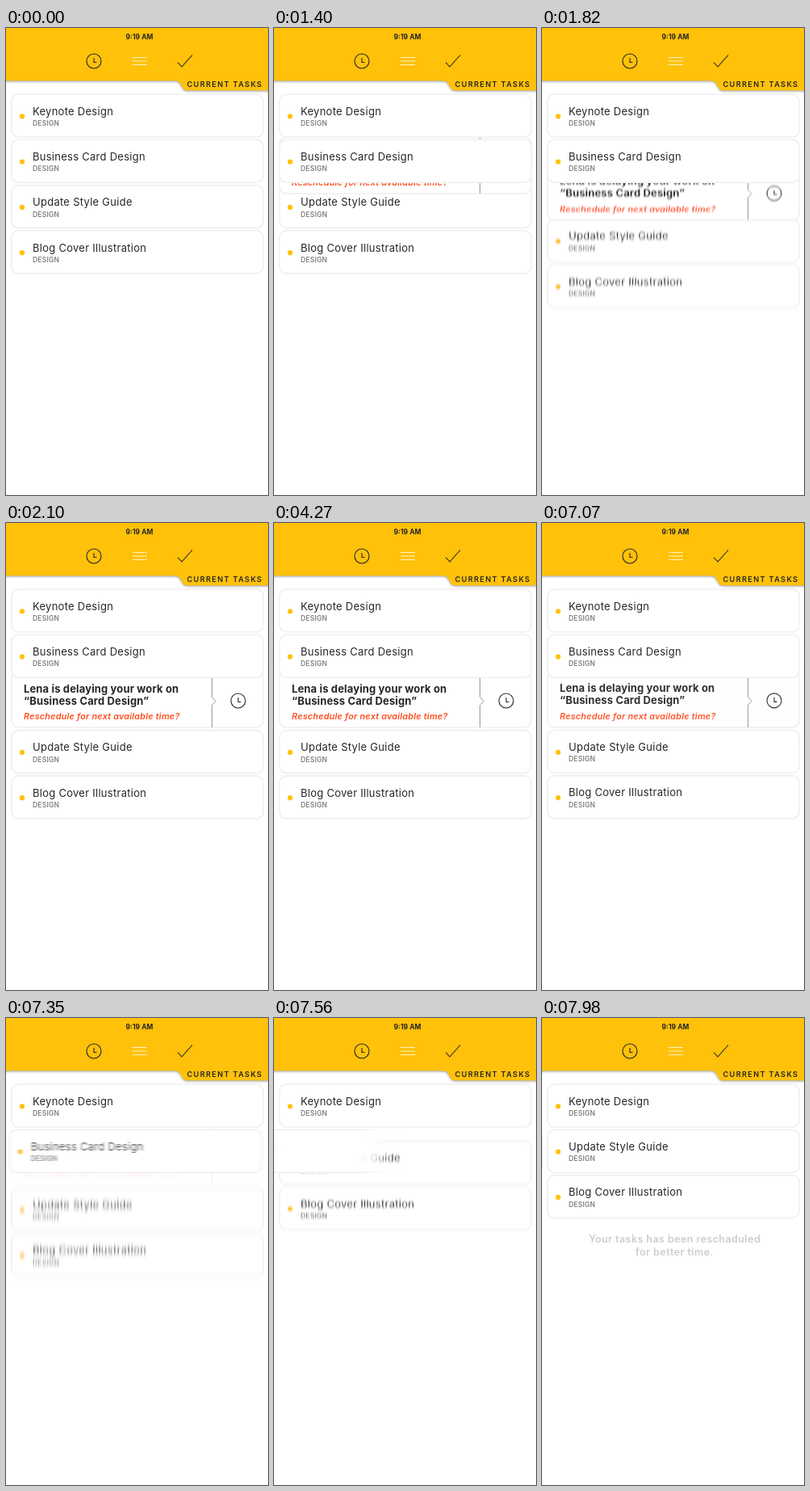
An HTML page for the animation above (8000 ms loop, 325x578 px).

```html
<!DOCTYPE html>
<html lang="en">
<head>
<meta charset="utf-8">
<title>Current tasks</title>
<style>
  html, body { margin: 0; height: 100%; overflow: hidden; background: #fff; }
  svg { display: block; width: 100%; height: 100%; font-family: Inter, "Open Sans", sans-serif; fill: #262626; }
  .box { fill: #fff; stroke: #efefef; stroke-width: 1.6; }
  .title { font-size: 13px; letter-spacing: .27px; }
  .tag { font-size: 8.5px; font-weight: 600; letter-spacing: .2px; fill: #808080; }
  .dot, .bar { fill: #ffc10a; }
  .bar { filter: drop-shadow(0 1px 1.5px rgba(0, 0, 0, .4)); }
  .line { fill: none; stroke: #262626; stroke-width: 1.1; }
  .menu { fill: none; stroke: #fff3c8; stroke-width: 1.1; }
  .divider { fill: none; stroke: #999; }
  .time { font-size: 8.5px; font-weight: 700; text-anchor: middle; }
  .tab { font-size: 9.2px; font-weight: 600; letter-spacing: 1.33px; }
  .notice { font-size: 13px; font-weight: 700; letter-spacing: .14px; }
  .ask { font-size: 10.8px; font-weight: 600; font-style: italic; letter-spacing: .22px; fill: #ff4c1c; }
  .done { font-size: 12.5px; font-weight: 600; letter-spacing: .43px; text-anchor: middle; fill: #cdcdcd; }
</style>
</head>
<body>
<svg viewBox="0 0 325 578" preserveAspectRatio="none">
  <defs>
    <filter id="blurCards" filterUnits="userSpaceOnUse" x="-60" width="460"><feGaussianBlur/></filter>
    <filter id="blurPanel" filterUnits="userSpaceOnUse" x="-60" width="460"><feGaussianBlur/></filter>
    <filter id="blurOut" filterUnits="userSpaceOnUse" x="-60" width="460"><feGaussianBlur/></filter>
    <clipPath id="panelClip"><rect x="7" y="183" width="312" height="70" rx="9"/></clipPath>
    <g id="clock" class="line"><circle r="9"/><path d="M0-4V1.5H3.5"/></g>
  </defs>

  <g id="rest"></g>

  <g id="panel">
    <rect class="box" x="6.7" y="183" width="312.6" height="70" rx="9"/>
    <circle id="ripple" cx="288" cy="221" fill="#f2f2f2" clip-path="url(#panelClip)"/>
    <path class="divider" d="M255.5 183V215.5L260 220.5 255.5 225.5V253"/>
    <use href="#clock" x="288" y="220"/>
    <text class="notice" x="22" y="209.5">Lena is delaying your work on</text>
    <text class="notice" x="22" y="224.5">“Business Card Design”</text>
    <text class="ask" x="22" y="243">Reschedule for next available time?</text>
  </g>

  <g id="leaving"></g>
  <g id="first"></g>

  <g id="done">
    <text class="done" x="164.5" y="278">Your tasks has been reschaduled</text>
    <text class="done" x="164.5" y="294">for better time.</text>
  </g>

  <path class="bar" d="M-9-9H334V77.3H225Q221 77.3 219.3 74.5L215.5 68Q213.500 65.2 209.500 65.2H-9Z"/>
  <text class="time" x="165.5" y="13.5">9:19 AM</text>
  <use href="#clock" x="109" y="41"/>
  <path class="menu" d="M157 36.5H175M157 41H175M157 45.5H175"/>
  <path class="line" d="M213 42.5L218 48 231 33.5"/>
  <text class="tab" x="224.5" y="73">CURRENT TASKS</text>
</svg>
<script>
const LOOP = 8000, STEP = 70, PITCH = 56.3, GAP = 62;
const $ = id => document.getElementById(id);

const card = (name, row) => `<g transform="translate(0 ${82 + row * PITCH})">
  <rect class="box" x="6.7" width="312.6" height="53" rx="9"/>
  <circle class="dot" cx="20" cy="27.3" r="3.1"/>
  <text class="title" x="33" y="25.7">${name}</text>
  <text class="tag" x="33" y="39">DESIGN</text></g>`;

$("first").innerHTML = card("Keynote Design", 0);
$("leaving").innerHTML = card("Business Card Design", 1);
$("rest").innerHTML = card("Update Style Guide", 2) + card("Blog Cover Illustration", 3);

const span = (t, a, b) => Math.min(1, Math.max(0, (t - a) / (b - a)));
const ease = x => x < .5 ? 2 * x * x : 1 - 2 * (1 - x) ** 2;
const open = t => ease(span(t, 1400, 2100));
const close = t => ease(span(t, 7052, 7726));

const restY = t => GAP * open(t) - (GAP + PITCH) * close(t);
const panelY = t => 48 * (open(t) - 1) - (GAP + PITCH) * close(t);
const leaveX = t => -319 * ease(span(t, 7324, 7754));

// Shutter blur in proportion to the speed at time t
const blur = (move, t) => Math.abs(move(t + 1) - move(t - 1)) * 5;

function place(id, filter, x, y, bx, by) {
  const group = $(id);
  group.setAttribute("transform", `translate(${x} ${y})`);
  if (bx + by > .15) {
    const f = $(filter), size = group.getBBox();
    f.setAttribute("y", size.y - 60);
    f.setAttribute("height", size.height + 120);
    f.firstElementChild.setAttribute("stdDeviation", `${bx} ${by}`);
    group.setAttribute("filter", `url(#${filter})`);
  } else {
    group.removeAttribute("filter");
  }
}

function draw(t) {
  place("rest", "blurCards", 0, restY(t), 0, blur(restY, t));
  place("panel", "blurPanel", 0, panelY(t), 0, blur(panelY, t));
  place("leaving", "blurOut", leaveX(t), 0, blur(leaveX, t), 0);

  $("panel").setAttribute("opacity", t < 1400 ? 0 : 1 - span(t, 7052, 7390));
  const grow = span(t, 6330, 6900);
  $("ripple").setAttribute("r", 300 * (1 - (1 - grow) ** 4.3));
  $("ripple").setAttribute("opacity", 1 - span(t, 6650, 7120));
  $("done").setAttribute("opacity", span(t, 7840, 7980));
}

const start = performance.now();
function tick() {
  const t = (performance.now() - start) % LOOP;
  draw(Math.floor(t / STEP) * STEP);
  requestAnimationFrame(tick);
}
tick();
</script>
</body>
</html>
```
